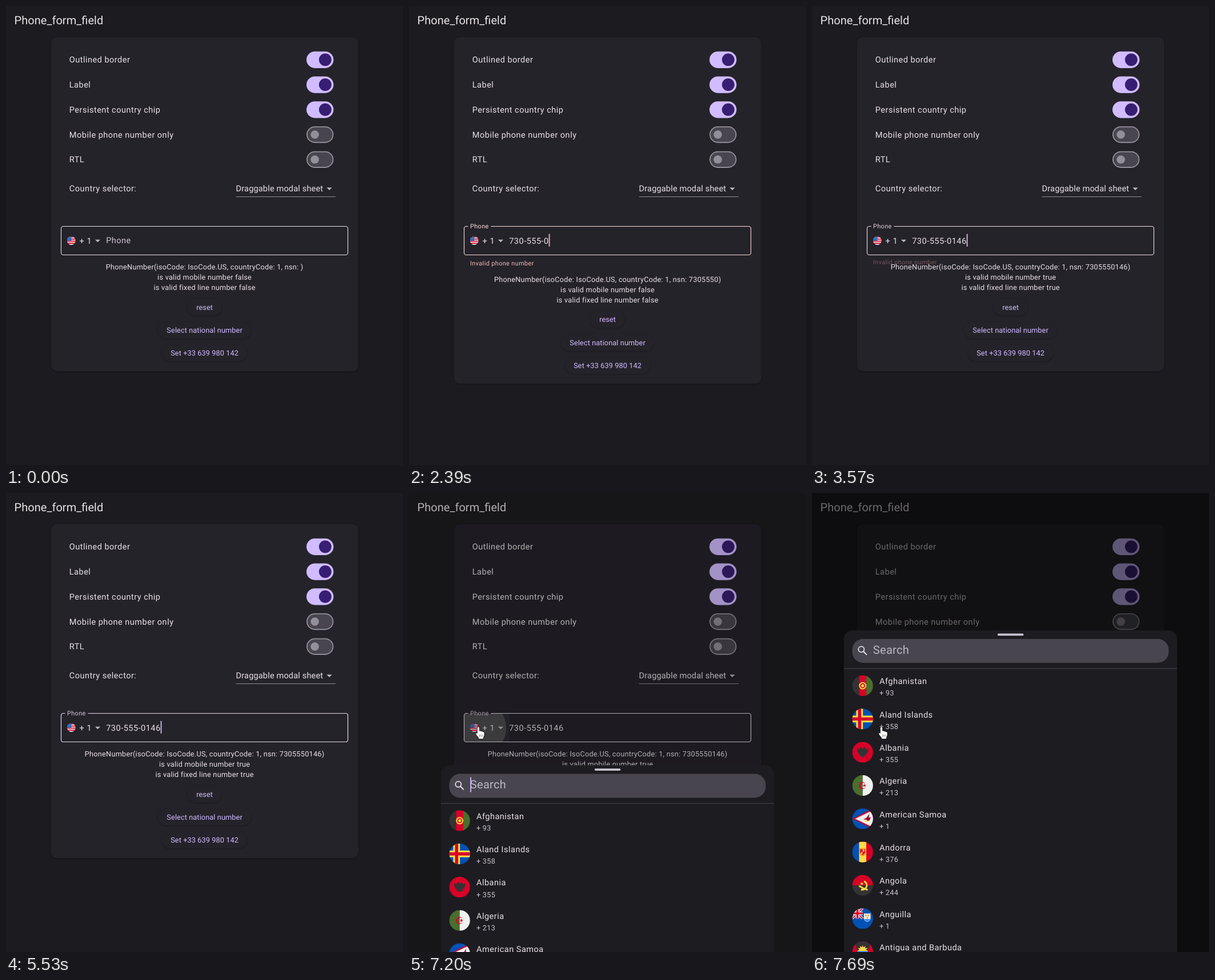
Recreate the animation shown at these times as an HTML page with a canvas. Size 695 px wide and 805 px high, loop 8000 ms.

```html
<!DOCTYPE html>
<html lang="en">
<head>
<meta charset="utf-8">
<title>Phone_form_field</title>
<style>
html, body { margin: 0; width: 100%; height: 100%; overflow: hidden; background: #1c1b1f; }
canvas { display: block; }
</style>
</head>
<body>
<canvas id="stage" width="695" height="805"></canvas>
<script>
const ctx = document.getElementById('stage').getContext('2d');
const LOOP = 8000, U = 0.9115, STEP = 80;
const LARGE = 16 * U, MEDIUM = 14 * U, SMALL = 12 * U, TITLE = 22 * U;
const INK = '#e6e1e5', SOFT = '#cac4d0', PRIMARY = '#d0bcff', CARD = '#25232a', SURFACE = '#1c1b1f';
const NUMBER = '7305550146';

// [time, digits in the field]
const KEYS = [[0, 0], [1080, 1], [1300, 2], [1390, 3], [1800, 4], [1900, 5], [2060, 6], [2390, 7],
  [2620, 8], [2710, 9], [2860, 10], [3310, 9], [3480, 10]];
// the caret toggles at each of these times
const BLINKS = [170, 640, 1080, 3980, 4460, 4980, 5530, 5910, 6470, 6960];
const ERRORS = [1080, 2860, 3310, 3480];

const clamp = v => Math.max(0, Math.min(1, v));
const mix = (a, b, p) => a + (b - a) * p;
const stepped = (t, start) => Math.floor((t - start) / STEP) * STEP;
const count = (list, t) => list.filter(at => at <= t).length;

function mixColor(a, b, p) {
  const part = (c, i) => parseInt(c.substr(1 + 2 * i, 2), 16);
  return 'rgb(' + [0, 1, 2].map(i => Math.round(mix(part(a, i), part(b, i), p))).join() + ')';
}

function bezier(x1, y1, x2, y2) {
  const at = (a, b, u) => 3 * a * u * (1 - u) * (1 - u) + 3 * b * u * u * (1 - u) + u * u * u;
  return x => {
    if (x <= 0 || x >= 1) return clamp(x);
    let lo = 0, hi = 1;
    for (let i = 0; i < 24; i++) {
      const m = (lo + hi) / 2;
      if (at(x1, x2, m) < x) lo = m; else hi = m;
    }
    return at(y1, y2, lo);
  };
}
const ease = bezier(0.25, 0.1, 0.25, 1);
const decelerate = bezier(0, 0, 0.2, 1);
const standard = bezier(0.4, 0, 0.2, 1);

// Value that goes 0 -> 1 -> 0 ... at the given times
function toggled(times, t, span = 170) {
  const n = count(times, t);
  if (!n) return 0;
  const p = clamp((stepped(t, times[n - 1]) + 30) / span);
  return n % 2 ? p : 1 - p;
}

function text(str, x, y, size, color, gap = 0, align = 'left') {
  ctx.font = `${size}px Roboto, sans-serif`;
  ctx.letterSpacing = gap * U + 'px';
  ctx.textRendering = 'geometricPrecision';
  ctx.textAlign = align;
  ctx.fillStyle = color;
  ctx.fillText(str, x, y);
  return ctx.measureText(str).width;
}
function rect(x, y, w, h, color) {
  ctx.fillStyle = color;
  ctx.fillRect(x, y, w, h);
}
function round(x, y, w, h, r, color) {
  ctx.beginPath();
  ctx.roundRect(x, y, w, h, r);
  ctx.fillStyle = color;
  ctx.fill();
}
function disc(x, y, r, color) {
  ctx.beginPath();
  ctx.arc(x, y, r, 0, 7);
  ctx.fillStyle = color;
  ctx.fill();
}
function poly(color, ...pts) {
  ctx.beginPath();
  for (let i = 0; i < pts.length; i += 2) ctx.lineTo(pts[i], pts[i + 1]);
  ctx.fillStyle = color;
  ctx.fill();
}
function line(color, width, ...pts) {
  ctx.beginPath();
  for (let i = 0; i < pts.length; i += 2) ctx.lineTo(pts[i], pts[i + 1]);
  ctx.strokeStyle = color;
  ctx.lineWidth = width;
  ctx.stroke();
}
function star(x, y, r, inner, n, color) {
  const pts = [];
  for (let i = 0; i < 2 * n; i++) {
    const a = i * Math.PI / n - Math.PI / 2, q = i % 2 ? inner : r;
    pts.push(x + q * Math.cos(a), y + q * Math.sin(a));
  }
  poly(color, ...pts);
}
function shadowed(draw) {
  ctx.save();
  ctx.shadowColor = 'rgba(0,0,0,0.3)';
  ctx.shadowBlur = 3;
  ctx.shadowOffsetY = 1;
  draw();
  ctx.restore();
}
function arrow(x, y, color) {
  poly(color, x - 4.6, y - 1.8, x + 4.6, y - 1.8, x, y + 2.8);
}

// Flags are drawn on a 512 unit square and cut to a circle
const RED = '#d80027', BLUE = '#0052b4', YELLOW = '#ffda44', WHITE = '#f0f0f0', BLACK = '#333333', GREEN = '#496e2d';
function flag(draw, x, y, r) {
  ctx.save();
  ctx.beginPath();
  ctx.arc(x, y, r, 0, 7);
  ctx.clip();
  ctx.translate(x - r, y - r);
  ctx.scale(r / 256, r / 256);
  draw();
  ctx.restore();
}
function columns(a, b, c) {
  rect(0, 0, 167, 512, a);
  rect(167, 0, 178, 512, b);
  rect(345, 0, 167, 512, c);
}
function usa() {
  rect(0, 0, 512, 512, WHITE);
  for (let y = 0; y < 512; y += 128) rect(0, y, 512, 64, RED);
  rect(0, 0, 256, 256, BLUE);
  for (let i = 0; i < 9; i++) star(60 + i % 3 * 75, 70 + Math.floor(i / 3) * 70, 30, 12, 5, WHITE);
}
function unionJack() {
  rect(0, 0, 256, 256, BLUE);
  for (const [c, w] of [[WHITE, 56], [RED, 22]]) {
    line(c, w, 0, 0, 256, 256);
    line(c, w, 256, 0, 0, 256);
  }
  for (const [c, w] of [[WHITE, 84], [RED, 48]]) {
    rect(128 - w / 2, 0, w, 256, c);
    rect(0, 128 - w / 2, 256, w, c);
  }
}
const COUNTRIES = [
  ['Afghanistan', 93, () => {
    columns(BLACK, RED, GREEN);
    disc(256, 256, 90, YELLOW);
    disc(256, 256, 62, RED);
    disc(256, 256, 36, YELLOW);
  }],
  ['Aland Islands', 358, () => {
    rect(0, 0, 512, 512, BLUE);
    for (const [c, w] of [[YELLOW, 166], [RED, 78]]) {
      rect(180 - w / 2, 0, w, 512, c);
      rect(0, 256 - w / 2, 512, w, c);
    }
  }],
  ['Albania', 355, () => {
    rect(0, 0, 512, 512, RED);
    poly(BLACK, 256, 175, 215, 125, 180, 150, 205, 180, 110, 165, 130, 215, 120, 245, 150, 265, 145, 300, 195, 300,
      170, 360, 225, 340, 256, 405, 287, 340, 342, 360, 317, 300, 367, 300, 362, 265, 392, 245, 382, 215, 402, 165,
      307, 180, 332, 150, 297, 125);
  }],
  ['Algeria', 213, () => {
    rect(0, 0, 256, 512, GREEN);
    rect(256, 0, 256, 512, WHITE);
    ctx.beginPath();
    ctx.arc(250, 256, 88, 0.62, 2 * Math.PI - 0.62);
    ctx.arc(272, 256, 68, 2 * Math.PI - 0.85, 0.85, true);
    ctx.fillStyle = RED;
    ctx.fill();
    star(300, 256, 48, 19, 5, RED);
  }],
  ['American Samoa', 1, () => {
    rect(0, 0, 512, 512, BLUE);
    poly(RED, 10, 256, 512, 0, 512, 512);
    poly(WHITE, 70, 256, 512, 42, 512, 470);
    poly('#a2001d', 270, 268, 350, 235, 420, 130, 405, 225, 455, 215, 430, 290, 380, 310, 350, 280);
    line(YELLOW, 20, 300, 310, 400, 318);
  }],
  ['Andorra', 376, () => {
    columns(BLUE, YELLOW, RED);
    poly('#ff9811', 176, 165, 336, 165, 336, 275, 312, 330, 256, 360, 200, 330, 176, 275);
    poly(RED, 196, 185, 316, 185, 316, 270, 256, 335, 196, 270);
    rect(256, 185, 42, 60, YELLOW);
    rect(216, 255, 40, 45, YELLOW);
  }],
  ['Angola', 244, () => {
    rect(0, 0, 512, 256, RED);
    rect(0, 256, 512, 256, BLACK);
    ctx.beginPath();
    ctx.arc(250, 256, 108, -1.2, 1.9);
    ctx.strokeStyle = YELLOW;
    ctx.lineWidth = 40;
    ctx.stroke();
    line(YELLOW, 38, 165, 270, 265, 325, 380, 370);
    star(235, 220, 48, 19, 5, YELLOW);
  }],
  ['Anguilla', 1, () => {
    rect(0, 0, 512, 512, BLUE);
    unionJack();
    poly(WHITE, 285, 130, 450, 130, 450, 265, 425, 310, 368, 335, 310, 310, 285, 265);
    poly('#338af3', 290, 268, 445, 268, 420, 306, 368, 325, 315, 306);
    for (const [x, y] of [[335, 180], [400, 180], [368, 235]]) disc(x, y, 22, '#ff9811');
  }],
  ['Antigua and Barbuda', 1, () => {
    rect(0, 0, 512, 512, RED);
    poly(BLACK, 60, 0, 452, 0, 380, 270, 132, 270);
    star(256, 230, 135, 85, 12, YELLOW);
    poly('#338af3', 120, 235, 392, 235, 340, 345, 172, 345);
    poly(WHITE, 172, 345, 340, 345, 256, 512);
  }]
];

function toggle(y, on) {
  const x = 526, w = 52 * U, h = 32 * U;
  if (on) {
    round(x, y - h / 2, w, h, h / 2, PRIMARY);
    disc(x + w - h / 2, y, 12 * U, '#381e72');
    return;
  }
  round(x, y - h / 2, w, h, h / 2, '#938f99');
  const b = 2 * U;
  round(x + b, y - h / 2 + b, w - 2 * b, h - 2 * b, h / 2 - b, '#49454f');
  disc(x + h / 2, y, 8 * U, '#938f99');
}

function outline(gap, color, width) {
  const l = 96.5, r = 598.5, top = 386.5, bottom = 436.5, k = 3.6, start = 103.6;
  ctx.beginPath();
  ctx.moveTo(start + gap, top);
  ctx.arcTo(r, top, r, bottom, k);
  ctx.arcTo(r, bottom, l, bottom, k);
  ctx.arcTo(l, bottom, l, top, k);
  ctx.arcTo(l, top, r, top, k);
  ctx.lineTo(start, top);
  ctx.strokeStyle = color;
  ctx.lineWidth = width;
  ctx.stroke();
}

function chip(t) {
  const hover = toggled([6260], t);
  if (hover) {
    ctx.save();
    ctx.beginPath();
    ctx.rect(97, 387, 78.3, 49);
    ctx.clip();
    rect(97, 387, 79, 49, `rgba(255,255,255,${0.04 * hover})`);
    if (t >= 6960) disc(121, 412, 15 + stepped(t, 6960) * 0.142, 'rgba(255,255,255,0.14)');
    ctx.restore();
  }
  flag(usa, 114.3, 411.5, 7.4);
  text('+ 1', 128.6, 416.5, LARGE, INK, 0.5);
  arrow(160.5, 411.5, '#b9b7bc');
}

function field(t, digits) {
  const float = t < 170 ? 0 : t >= 390 ? 1 : standard(clamp((stepped(t, 170) + 30) / 200));
  const bad = toggled(ERRORS, t), focus = toggled([5530, 6260], t);
  const tint = base => focus ? mixColor(base, PRIMARY, focus) : mixColor(base, '#f9dedc', bad);

  chip(t);
  outline(40 * float, tint(INK), mix(1.1, 1.9, focus));
  text('Phone', mix(175.2, 107, float), mix(416.2, 390.1, float), mix(LARGE, SMALL, float), tint(SOFT), mix(0.5, 0.375, float));

  const shown = [digits.slice(0, 3), digits.slice(3, 6), digits.slice(6)].filter(Boolean).join('-');
  const w = text(shown, 175.2, 417, LARGE, INK, 0.5);
  if (count(BLINKS, t) % 2) rect(175.2 + w, 399.8, 1.8, 22, mixColor(PRIMARY, '#f2b8b5', bad));

  if (bad) {
    ctx.globalAlpha = bad;
    text('Invalid phone number', 107, mix(451.6, 455.2, bad), SMALL, '#f2b8b5', 0.4);
    ctx.globalAlpha = 1;
  }
}

function page(t) {
  const digits = NUMBER.slice(0, KEYS.filter(k => k[0] <= t).pop()[1]);
  const valid = digits.length === 10;
  const drop = count(ERRORS, t) % 2 ? 24 * U : 0;

  rect(0, 0, 695, 805, SURFACE);
  text('Phone_form_field', 14.6, 31.6, TITLE, INK);
  shadowed(() => round(78.7, 54.8, 538, 585.6 + drop, 12 * U, CARD));

  ['Outlined border', 'Label', 'Persistent country chip', 'Mobile phone number only', 'RTL'].forEach((name, i) => {
    const y = 94.3 + i * 48 * U;
    text(name, 110.8, y + 5, LARGE, INK, 0.5);
    toggle(y, i < 3);
  });
  text('Country selector:', 110.8, 325.2, LARGE, INK, 0.5);
  text('Draggable modal sheet', 402.6, 325.2, LARGE, INK, 0.15);
  arrow(566, 320.2, '#bdbdbf');
  rect(402.6, 334, 174.4, 1, 'rgba(189,189,189,0.7)');

  field(t, digits);

  const mid = 347.6;
  [`PhoneNumber(isoCode: IsoCode.US, countryCode: 1, nsn: ${digits})`,
    `is valid mobile number ${valid}`, `is valid fixed line number ${valid}`].forEach((s, i) =>
    text(s, mid, 461.8 + drop + i * 20 * U, MEDIUM, INK, 0.25, 'center'));

  [['reset', 30], ['Select national number', 133], ['Set +33 639 980 142', 119]].forEach(([s, w], i) => {
    const y = 528.2 + drop + i * 44 * U;
    shadowed(() => round(mid - w / 2 - 15, y - 14.6, w + 30, 29.2, 14.6, CARD));
    text(s, mid, y + 4.4, MEDIUM, PRIMARY, 0.1, 'center');
  });
}

function sheet(t) {
  const p = t >= 7380 ? 1 : clamp((stepped(t, 6960) - 177) / 250);
  if (!p) return;
  rect(0, 0, 695, 805, `rgba(0,0,0,${0.54 * ease(p)})`);
  ctx.save();
  ctx.translate(0, mix(805, 241, decelerate(p)));
  round(55.8, 0, 583.4, 620, [15, 15, 0, 0], '#1d1c21');
  round(324.8, 5.6, 45.6, 3.7, 1.8, SOFT);
  round(70.4, 15, 554, 41.8, 19, '#49454f');

  ctx.beginPath();
  ctx.arc(86.3, 33.2, 5, 0, 7);
  ctx.strokeStyle = INK;
  ctx.lineWidth = 1.8;
  ctx.stroke();
  line(INK, 2, 89.8, 36.7, 95.8, 42.7);

  text('Search', 106.8, 40.8, TITLE, '#bcb7c0', 0.3);
  if (t < 7690) rect(107.2, 21, 1.8, 26, PRIMARY);
  rect(55.8, 66.3, 583.4, 1, '#49454f');

  COUNTRIES.forEach(([name, code, draw], i) => {
    const y = i * 64 * U;
    flag(draw, 88.7, y + 97, 18.2);
    text(name, 118, y + 94.2, LARGE, INK, 0.5);
    text('+ ' + code, 118, y + 114.3, MEDIUM, SOFT, 0.25);
  });
  ctx.restore();
}

const HAND = new Path2D('M3 2.2C3 0 6.3 0 6.3 2.2V8C6.8 6.8 9.3 7.1 9.3 8.6C10 7.6 12 8 12.2 9.4' +
  'C13 8.7 14.8 9.3 14.8 10.8V14C14.8 16 13.2 17.5 13 21H5.5C5.5 18.5 2.5 16.5 .6 13C-.3 11 1.5 10.2 3 12Z');
function pointer(t) {
  if (t < 6260) return;
  ctx.save();
  ctx.translate(116.8, 410);
  ctx.strokeStyle = '#111';
  ctx.lineWidth = 1.6;
  ctx.stroke(HAND);
  ctx.fillStyle = '#fff';
  ctx.fill(HAND);
  for (const x of [6.6, 9, 11.4]) line('#555', 0.7, x, 13.5, x, 17.5);
  ctx.restore();
}

const begin = performance.now();
function frame() {
  const t = (performance.now() - begin) % LOOP;
  page(t);
  sheet(t);
  pointer(t);
  requestAnimationFrame(frame);
}
frame();
</script>
</body>
</html>
```
